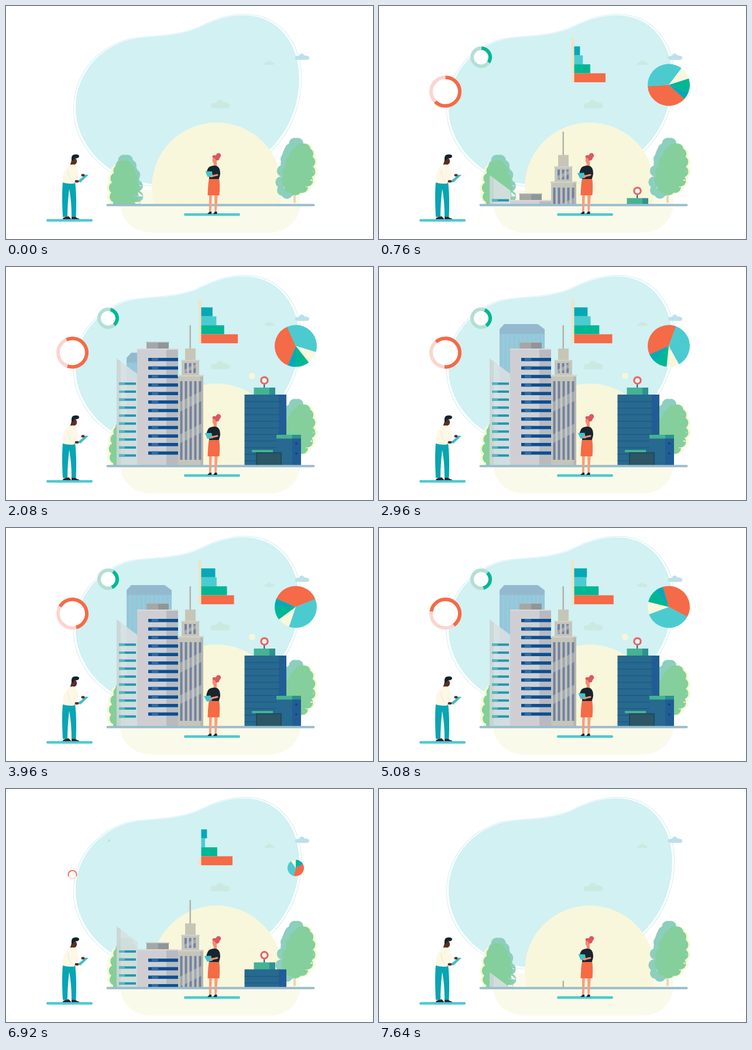
Animation, 627 px wide and 400 px high, one loop 7.68 s. Source, as an HTML page with a canvas:

```html
<!DOCTYPE html>
<html lang="en">
<head>
<meta charset="utf-8">
<title>City growth</title>
<style>
html, body { margin: 0; width: 100%; height: 100%; overflow: hidden; background: #fff; }
canvas { display: block; width: 627px; height: 400px; }
</style>
</head>
<body>
<canvas id="stage"></canvas>
<script>
const W = 627, H = 400, LOOP = 7680, GROUND = 341, SWAY = LOOP / 3;
const TEAL = '#4bcbd0', BLUE = '#06a8b6', GREEN = '#00b795', ORANGE = '#f56a47', CREAM = '#f9f7dc';
const canvas = document.getElementById('stage');
const ctx = canvas.getContext('2d');
const ratio = window.devicePixelRatio || 1;
canvas.width = W * ratio;
canvas.height = H * ratio;

const rad = a => a * Math.PI / 180;
const clamp = p => Math.max(0, Math.min(1, p));
const smooth = p => { p = clamp(p); return p * p * (3 - 2 * p); };
const pop = (t, start, end) => smooth((t - start) / 560) * (1 - smooth((t - end) / 560));

function box(x, y, w, h, color) {
  ctx.fillStyle = color;
  ctx.fillRect(x, y, w, h);
}
function shape(color, d) {
  ctx.fillStyle = color;
  ctx.fill(new Path2D(d));
}
function stroke(color, width, d) {
  ctx.strokeStyle = color;
  ctx.lineWidth = width;
  ctx.lineCap = 'round';
  ctx.stroke(new Path2D(d));
}
function disc(x, y, r, color, ry = r) {
  ctx.fillStyle = color;
  ctx.beginPath();
  ctx.ellipse(x, y, r, ry, 0, 0, 7);
  ctx.fill();
}
function slab(x, y, length, width, color) {
  stroke(color, width, `M${x + width / 2} ${y}h${length - width}`);
}
function repeat(n, draw) {
  for (let i = 0; i < n; i++) draw(i);
}
function at(x, y, scale, draw) {
  if (scale <= 0) return;
  ctx.save();
  ctx.translate(x, y);
  ctx.scale(scale, scale);
  draw();
  ctx.restore();
}
function aboveGround(draw) {
  ctx.save();
  ctx.beginPath();
  ctx.rect(0, 0, W, GROUND);
  ctx.clip();
  draw();
  ctx.restore();
}

const BLOB = 'M119 176C119 120 155 74 210 58C248 50 290 56 334 35C360 23 381 16 406 16' +
  'C468 16 501 68 501 124C501 170 483 214 452 245C410 288 340 306 262 306C180 306 119 240 119 176Z';

function cloud(x, y, scale, color) {
  at(x, y, scale, () => {
    shape(color, 'M-12 6a4.500 4.500 0 0 1 0-9h24a4.500 4.500 0 0 1 0 9Z');
    disc(-1, -2.5, 6, color);
    disc(7, 0, 4.5, color);
  });
}

// Egg-shaped crown with a scalloped edge; lean shifts the top sideways.
function crown(x, y, rx, ry, lean, color) {
  const bump = 10, n = 13;
  ctx.fillStyle = color;
  ctx.beginPath();
  repeat(n, i => {
    const a = (i + .25) / n * Math.PI * 2, s = Math.sin(a);
    const px = x + (rx - bump) * Math.cos(a) * (1 + .25 * s) - lean * s;
    const py = y + (ry - bump) * s;
    ctx.moveTo(x, y);
    ctx.lineTo(px, py);
    ctx.arc(px, py, bump, 0, Math.PI * 2);
  });
  ctx.fill();
  disc(x, y, rx - bump / 2, color, ry - bump);
}

function trees() {
  crown(198, 308, 26, 44, 0, '#f7f9d2');
  crown(208, 304, 25, 50, -4, '#8ccfbd');
  crown(202, 308, 26, 44, 0, '#84cf9b');
  crown(505, 280, 28, 45, 5, '#f7f9d2');
  crown(488, 278, 24, 53, 8, '#8ccfbd');
  box(491, 318, 4, 20, '#ead7b4');
  crown(501, 280, 28, 45, 6, '#84cf9b');
}

function scenery() {
  box(0, 0, W, H, '#fff');
  ctx.save();
  ctx.translate(310, 161);
  ctx.scale(1.019, 1.019);
  ctx.translate(-310, -160);
  stroke('#d3eeef', 1, BLOB);
  ctx.restore();
  shape('#d1f1f3', BLOB);
  cloud(506, 88, .74, '#bce0ea');
  cloud(450, 98, .5, '#cbe9e1');
  cloud(366, 169.5, 1, '#cbe9e1');
  shape('#fafaeb', 'M215 316H483Q503 316 503 338C503 368 480 389 450 389H248C218 389 195 368 195 338Q195 316 215 316Z');
  aboveGround(() => {
    disc(360, 311, 111, '#f8f7db');
    trees();
  });
}

function backTower() {
  const hull = 'M206 107L214 98H271L283 107';
  shape('#9ac4d7', hull + 'V345H206Z');
  shape('#94b9cf', hull + 'V115H206Z');
  repeat(10, i => box(211 + i * 7.4, 115, 3, 230, '#8dcfe0'));
}

function slantedBlock() {
  shape('rgba(216,224,225,.9)', 'M189 157L225 184V345H189Z');
  shape('rgba(190,202,202,.45)', 'M189 157L196 162V345H189Z');
  repeat(10, i => {
    const y = 198.3 + i * 13.7;
    box(193, y, 29, 4, '#2595ae');
    box(193, y, 10, 4, '#58b5bf');
  });
}

function officeBlock() {
  box(240, 129, 20, 12, '#a4a7a7');
  box(260, 129, 18, 12, '#8f9697');
  box(239, 128.5, 40, 1.5, '#b6babb');
  box(224, 140, 50, 205, '#cfcfd3');
  box(274, 140, 20, 205, '#b8babf');
  box(224, 140, 70, 2, '#d9d9dc');
  repeat(12, i => {
    const y = 156 + i * 14.6;
    box(243, y, 51, 5.6, '#0b4f93');
    box(249, y, 11, 5.6, '#2f6ca6');
  });
}

function glass(n, x, y, step, height) {
  repeat(n, i => box(x + i * step, y, 4, height, '#7281a2'));
}
function spireTower() {
  const wall = '#c4c5bb', shine = 'rgba(203,205,198,.5)';
  box(313.5, 100, 2.5, 41, '#b1b2ab');
  box(306, 140, 18, 21, '#c7c6b6');
  box(300, 160, 30, 27, wall);
  box(299, 159.5, 32, 2, '#d2d2c8');
  glass(3, 305, 165, 7.6, 17);
  shape(shine, 'M305 176L325 166V173L305 182Z');
  box(294, 186, 43, 159, wall);
  box(332, 188, 5, 157, '#b7b8ad');
  glass(5, 297.5, 196, 8, 135);
  shape(shine, 'M296 232l38-19v17l-38 19ZM296 288l38-19v15l-38 19Z');
  box(293, 185.5, 45, 2.5, '#d2d2c8');
}

function blueBlock() {
  const front = '#27698f', side = '#215d94', roof = '#45b293', roofSide = '#2d928e';
  disc(420.5, 187, 5.5, '#f6f6da');
  box(440.2, 200, 2, 8, '#20558a');
  disc(441.5, 194.7, 7.2, '#e96562');
  disc(441.5, 194.7, 4, '#eef7f3');
  box(423.5, 207, 27, 13, roof);
  box(450, 207, 10, 13, roofSide);
  box(407.5, 219, 59, 126, front);
  box(466, 219, 13, 126, side);
  repeat(10, i => box(407.5, 230.5 + i * 11.3, 59, 1, '#195582'));
  box(462, 288, 27, 57, front);
  box(489, 288, 15, 57, side);
  box(462, 288, 27, 6.5, roof);
  box(489, 288, 15, 6.5, roofSide);
  repeat(2, i => disc(496, 303 + i * 17, 1.8, '#163d6d'));
  box(420, 314, 36, 4, roof);
  box(427, 318, 44, 27, '#1f4962');
  box(429, 320, 40, 25, '#2c5663');
}

const BUILDINGS = [
  { draw: backTower, height: 243, rise: 944, fall: 5500 },
  { draw: slantedBlock, height: 184, rise: 208, fall: 5870, fallTime: 2327 },
  { draw: officeBlock, height: 213, rise: 460, fall: 5976 },
  { draw: spireTower, height: 241, rise: -60, fall: 6254 },
  { draw: blueBlock, height: 160, rise: 260, fall: 6050 }
];

function city(t) {
  BUILDINGS.forEach(({ draw, height, rise, fall, fallTime = 1600 }) => {
    const hidden = 1 - smooth((t - rise) / 1600) + smooth((t - fall) / fallTime);
    if (t >= 40 && hidden < 1) at(0, height * hidden, 1, draw);
  });
}

function ring(r, color, from, to) {
  ctx.lineWidth = 6;
  ctx.lineCap = 'butt';
  ctx.strokeStyle = color;
  ctx.beginPath();
  ctx.arc(0, 0, r, rad(from), rad(to));
  ctx.stroke();
}
function donut(r, base, color, mid, span) {
  disc(0, 0, r, '#fff');
  ring(r, base, 0, 360);
  ring(r, color, mid - span / 2, mid + span / 2);
}

function pie(start) {
  const slices = [[135, ORANGE], [131, TEAL], [35, CREAM], [38, GREEN], [21, BLUE]];
  slices.forEach(([span, color]) => {
    ctx.fillStyle = color;
    ctx.beginPath();
    ctx.moveTo(0, 0);
    ctx.arc(0, 0, 36, rad(start), rad(start + span + .8));
    ctx.fill();
    start += span;
  });
}

// Each bar swells once per loop: a higher power is a rounder hump, a lower skew peaks earlier.
const BARS = [
  { color: BLUE, peak: 24, power: .75 },
  { color: TEAL, peak: 28, power: 1, skew: .75 },
  { color: GREEN, peak: 44, power: .4 },
  { color: ORANGE, peak: 62, power: .1, wave: .1 }
];
function barChart(t) {
  const axis = pop(t, 100, 6500) * 76, size = pop(t, 100, 7080);
  box(328.5, 131 - axis, 5, axis, '#ebe6c6');
  BARS.forEach(({ color, peak, power, skew = 1, wave = 0 }, i) => {
    const hump = Math.sin(Math.PI * (t / LOOP) ** skew) ** power;
    const ripple = 1 + wave * Math.cos(2 * Math.PI * t / SWAY);
    box(333.5, 69.3 + i * 15.4, peak * hump * ripple * size, 15.4, color);
  });
}

function charts(t) {
  const s = t / 1000;
  at(113.5, 147, pop(t, 100, 6560), () => donut(24.5, '#fbd5d0', ORANGE, 37 - 18.8 * s, 225));
  at(174.5, 88, pop(t, 160, 6480), () => donut(15.5, '#b3dfd4', GREEN, 326 + 9.6 * s, 122));
  at(495, 135.5, pop(t, 200, 6600), () => pie(56.3 * s - 1.24 * s * s - 1));
  barChart(t);
}

function man() {
  const skin = '#5a2f22', hair = '#13242c', shirt = '#fcf8e5';
  slab(69, 368, 79, 4.5, TEAL);
  shape('#35232c', 'M97 366q0-3 5-4l5-1 4 4v1ZM112 366v-5h6q2 3 7 4v1Z');
  shape('#08a5b3', 'M97 302H118Q121 325 119.500 362H112Q112 335 108 314Q105 340 105 362H97Q95 325 97 302Z');
  shape(skin, 'M112 265L119 268L116 275H109Z');
  disc(116.5, 266.5, 4.6, skin, 5.8);
  shape(hair, 'M112 265Q111 255 117 255Q124 254 125 257.500Q125 261 120 261.500Q116 261 114 266Z');
  shape(shirt, 'M108 273Q119 270 121 277Q125 287 124 292Q118 300 117 304.500Q106 306 97 303Q96 282 108 273Z');
  stroke('#eee5d1', 1, 'M106 282Q106 292 112 300');
  shape('#41bec8', 'M122 301L136 289.500L141 290L127 303Z');
  disc(121, 301, 3.4, skin, 2.2);
  disc(131.5, 290.5, 3, skin, 2.2);
}

function woman(t) {
  const skin = '#f58d6d', hair = '#df5560';
  const sway = 4.2 * Math.sin(Math.PI * t / SWAY) ** 2;
  slab(304, 358, 96, 4.5, TEAL);
  shape('#f99e80', 'M347 322h5l-1.500 32h-3.500ZM356 322h6l-2.500 32h-3Z');
  shape('#1a2631', 'M344 357l4-4h3v4ZM354 357l3-4h3.500v4Z');
  shape('#f46b46', 'M347 295H364Q366 308 364.500 325H344.500Q345 306 347 295Z');
  shape(skin, 'M354.500 266H360V276H355Z');
  disc(356.5, 264, 3.8, skin, 6);
  disc(363, 256.8, 4.2, hair);
  disc(360.5, 260.5, 4.4, hair, 4.8);
  disc(356, 258.5, 3.4, hair, 2.6);
  disc(355.5, 265, 2.6, skin, 4);
  shape('#17252e', 'M350 275Q356 273 361 275Q366 278 366 288Q365 294 363.500 297H347Q348 291 345 290Q341 289 343 284Q345 276 350 275Z');
  stroke(skin, 3, 'M361 290L352 292');
  ctx.save();
  ctx.translate(347 - sway * .5, 288 + sway);
  ctx.rotate(-sway * .035);
  shape('#43c3cb', 'M-6.500-4.500L5-4L6.500 5L-2.500 5.500Z');
  ctx.restore();
  disc(351, 292.5, 2.8, skin, 1.8);
}

function frame(t) {
  ctx.setTransform(ratio, 0, 0, ratio, 0, 0);
  scenery();
  charts(t);
  aboveGround(() => city(t));
  slab(171.5, 341.7, 356, 4, '#9abdcb');
  man();
  woman(t);
}

const begin = performance.now();
function tick() {
  frame((performance.now() - begin) % LOOP);
  requestAnimationFrame(tick);
}
tick();
</script>
</body>
</html>
```
